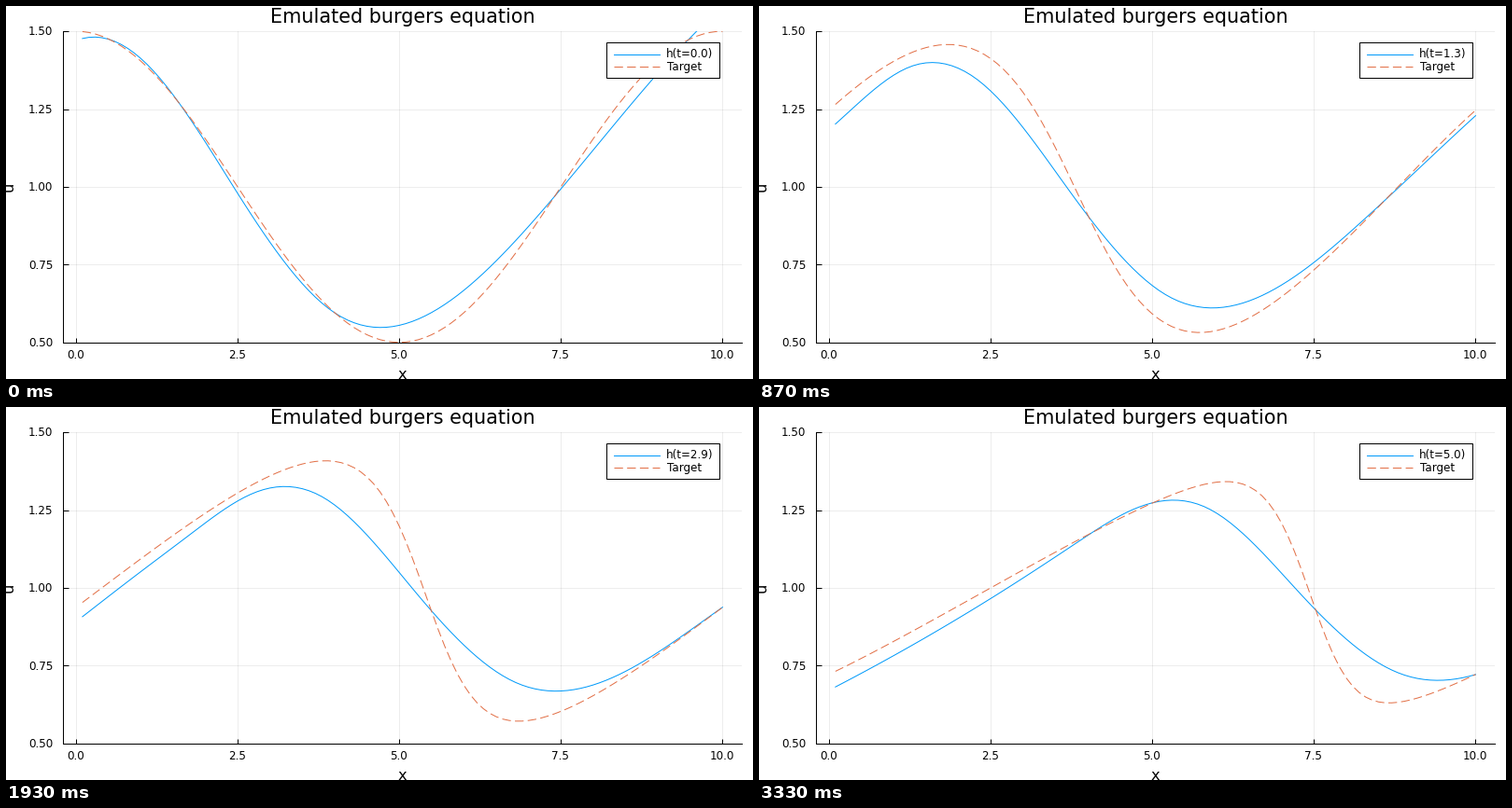
A matplotlib script for the animation above (3.39 s loop, 800 px wide and 400 px high).

```python
import numpy as np
import matplotlib.pyplot as plt
from matplotlib.animation import FuncAnimation
from matplotlib.lines import Line2D
from matplotlib.patches import Rectangle
from matplotlib.transforms import Affine2D

W, H, DPI = 800, 400, 100
BLUE, ORANGE = "#009afa", "#e26f46"
DASH = (0, (9.3, 4.4))
PX = 72 / DPI            # one pixel in points
SMALL, MEDIUM, LARGE = (size * 16 / 15 for size in (8, 11, 14))

LOOP, TICK = 3390, 10    # ms
STEPS, DT = 51, 0.1      # solution snapshots, t = 0 ... 5
END = DT * (STEPS - 1)

DX, NU = 0.1, 0.1
x = DX * np.arange(1, 101)


def burgers(u):
    """Upwind advection plus diffusion on a periodic grid."""
    left, right = np.roll(u, 1), np.roll(u, -1)
    return -u * (u - left) / DX + NU * (right - 2 * u + left) / DX**2


def solve_burgers(substeps=10):
    u = 1 + 0.5 * np.cos(2 * np.pi * x / 10)
    h = DT / substeps
    rows = [u]
    for _ in range(STEPS - 1):
        for _ in range(substeps):
            k1 = burgers(u)
            k2 = burgers(u + h / 2 * k1)
            k3 = burgers(u + h / 2 * k2)
            k4 = burgers(u + h * k3)
            u = u + h / 6 * (k1 + 2 * k2 + 2 * k3 + k4)
        rows.append(u)
    return np.array(rows)


def spline(nodes, values, at):
    """Not-a-knot cubic spline."""
    def basis(s):
        s = np.asarray(s, float)[:, None]
        return np.hstack([s ** np.arange(4),
                          np.clip(s - nodes[2:-2], 0, None) ** 3])
    return basis(at) @ np.linalg.solve(basis(nodes), values)


# The emulated wave travels at constant speed while its profile
# eases from a first shape to a last one.
SPEED, EASE = 0.965, 1.72
KNOTS = np.array([-5, -3.5, -2, -1, 0, 1, 2.5, 4, 5.5, 7, 8.5, 10])
FIRST = [.30, .64, 1.06, 1.29, 1.47, 1.413, .979, .595, .596, .873, 1.244, 1.58]
LAST = [.652, .82, 1.008, 1.144, 1.262, 1.259, .973, .725, .745, .918, 1.09, 1.26]


def emulate(t):
    xi = x - SPEED * t
    fade = (1 - t / END) ** EASE
    return fade * spline(KNOTS, FIRST, xi) + (1 - fade) * spline(KNOTS, LAST, xi)


target = solve_burgers()
emulated = [emulate(t) for t in np.linspace(0, END, STEPS)]

plt.rcParams["font.family"] = "DejaVu Sans"
fig = plt.figure(figsize=(W / DPI, H / DPI), dpi=DPI, facecolor="white")
pixels = Affine2D().scale(1 / W, -1 / H).translate(0, 1) + fig.transFigure


def label(px, py, text, size, ha="center", **kw):
    return fig.text(px, py, text, fontsize=size, ha=ha, va="baseline",
                    transform=pixels, **kw)


# Plot area
L, R, T, B = 61.3, 788, 27.1, 360.7
ax = fig.add_axes([L / W, 1 - B / H, (R - L) / W, (B - T) / H])
margin = 0.03 * (x[-1] - x[0])
xlim, ylim = (x[0] - margin, x[-1] + margin), (0.5, 1.5)
xticks, yticks = np.linspace(0, 10, 5), np.linspace(0.5, 1.5, 5)
ax.set(xlim=xlim, ylim=ylim, xticks=xticks, yticks=yticks)
ax.tick_params(direction="in", length=5.5 * PX, width=PX,
               labelbottom=False, labelleft=False)
ax.grid(color="black", alpha=0.1, linewidth=0.7 * PX)
ax.set_axisbelow(True)
for side, spine in ax.spines.items():
    spine.set_visible(side in ("left", "bottom"))
    spine.set_linewidth(PX)

for v in xticks:
    px = L + (v - xlim[0]) / (xlim[1] - xlim[0]) * (R - L)
    label(px - 0.5, 378.3, f"{v:.1f}", SMALL)
for v in yticks:
    py = B - (v - ylim[0]) / (ylim[1] - ylim[0]) * (B - T)
    label(50.2, py + 4.3, f"{v:.2f}", SMALL, ha="right")

label((L + R) / 2, 18.5, "Emulated burgers equation", LARGE)
label((L + R) / 2, 399.5, "x", MEDIUM)
label(7.7, (T + B) / 2, "u", MEDIUM, rotation=90, rotation_mode="anchor")

blue = dict(color=BLUE, linewidth=PX)
orange = dict(color=ORANGE, linewidth=PX, linestyle=DASH,
              dash_capstyle="butt")
emulated_line, = ax.plot(x, emulated[0], **blue)
target_line, = ax.plot(x, target[0], **orange)

# Legend
fig.add_artist(Rectangle((643, 38.8), 120.7, 38.4, facecolor="white",
                         edgecolor="black", linewidth=PX, transform=pixels))
for py, style in ((51.8, blue), (64.8, orange)):
    fig.add_artist(Line2D([651, 700], [py, py], transform=pixels, **style))
time_label = label(706.5, 55.5, "", SMALL, ha="left")
label(707.5, 68.7, "Target", SMALL, ha="left")


def update(n):
    # 15 snapshots per second, each starting on the nearest 10 ms tick
    k = min(int((n + 0.5) * 3 / 20), STEPS - 1)
    emulated_line.set_ydata(emulated[k])
    target_line.set_ydata(target[k])
    time_label.set_text(f"h(t={k * DT:.1f})")
    return emulated_line, target_line, time_label


anim = FuncAnimation(fig, update, frames=LOOP // TICK, interval=TICK,
                     repeat=True, repeat_delay=0, cache_frame_data=False)
plt.show()
```
